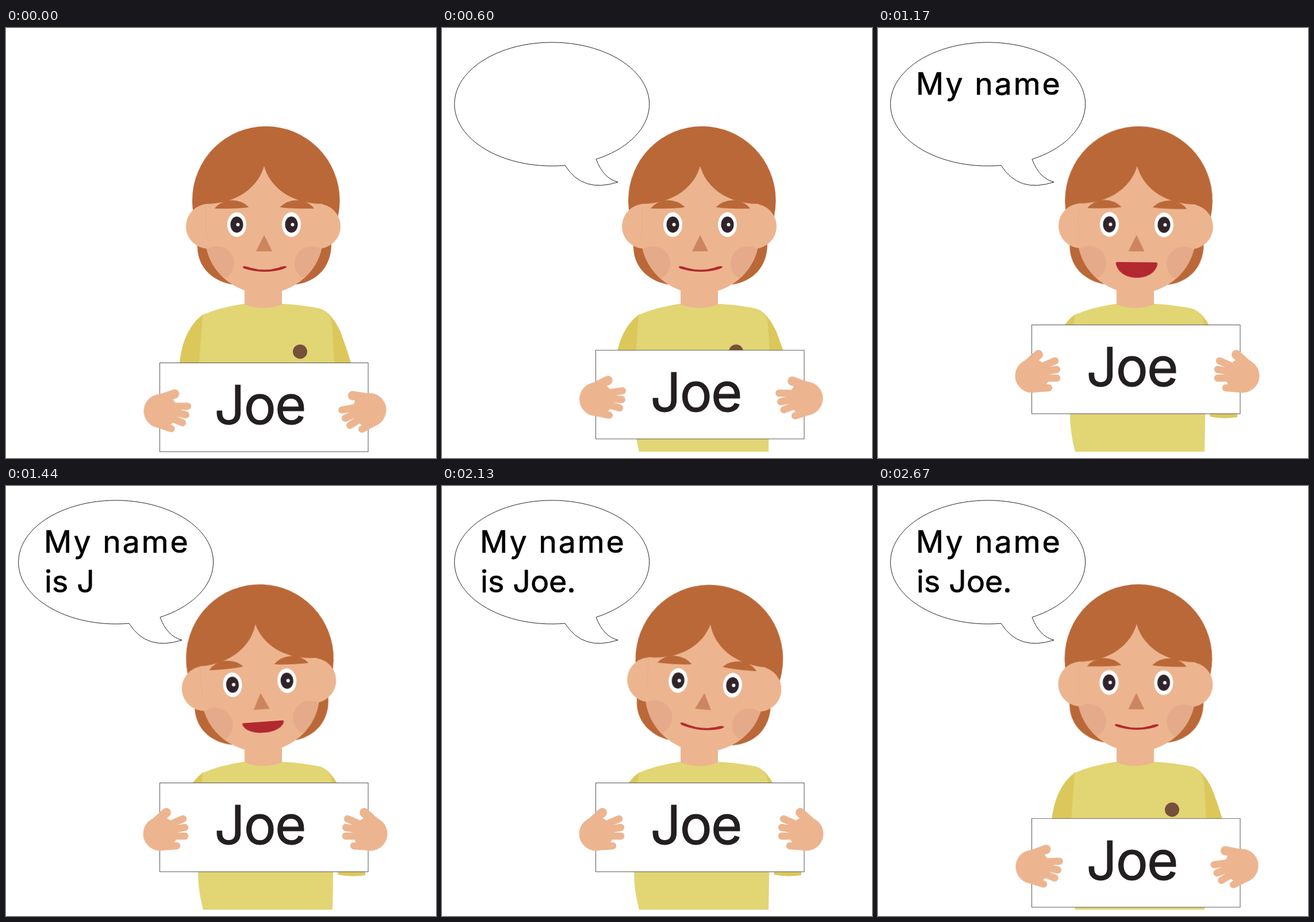
Recreate the animation shown at these times as an HTML page without scripts. Size 748 by 748 pixels, loop 2.7 s.

```html
<!DOCTYPE html>
<html lang="en">
<head>
<meta charset="utf-8">
<title>My name is Joe</title>
<style>
  html, body { margin: 0; width: 100%; height: 100%; overflow: hidden; background: #fff; }
  svg { display: block; width: 100%; height: 100%; }

  .skin { fill: #ecb58f; }
  .hair { fill: #ba6838; }
  .shirt { fill: #e2d574; }
  .sleeve { fill: #dcc75a; }
  .lips { fill: #b2282f; }
  .fingers { fill: none; stroke: #ecb58f; stroke-width: 12.5; stroke-linecap: round; }
  .outline { fill: #fff; stroke: #222; stroke-width: 1; }
  text { font-family: Inter, sans-serif; stroke-linejoin: round; }

  .head, .sign, .hand, .bubble, .smile, .talk, .speech {
    animation: 2700ms linear infinite;
  }

  .head { transform-origin: 448px 446px; animation-name: sway; }
  @keyframes sway {
    0%, 100% { transform: rotate(0deg); }
    11.111%, 55.556% { transform: rotate(-5.25deg); }
    33.333%, 77.778% { transform: rotate(5.25deg); }
  }

  .sign { animation-name: lift; }
  @keyframes lift {
    0%, 16.667%, 100% { transform: translateY(66px); }
    33.333%, 83.333% { transform: translateY(0); }
  }

  .hand { transform-origin: 280px 605px; animation-name: grip; }
  @keyframes grip {
    0%, 16.667%, 100% { transform: rotate(var(--tilt)); }
    33.333%, 83.333% { transform: rotate(0deg); }
  }

  .bubble { transform-origin: 192px 241px; animation-name: grow; }
  @keyframes grow {
    0%, 5.556% { transform: scale(0); }
    22.222%, 100% { transform: scale(1); }
  }

  .smile { animation-name: rest; }
  @keyframes rest {
    0%, 22.7%, 66.6%, 100% { visibility: visible; }
    22.8%, 66.5% { visibility: hidden; }
  }

  .talk { transform-origin: 450px 416.5px; animation-name: talk; }
  @keyframes talk {
    0%, 22.7% { transform: scaleY(.2); visibility: hidden; }
    22.8% { transform: scaleY(.2); visibility: visible; }
    44.444% { transform: scaleY(1); visibility: visible; }
    66.5% { transform: scaleY(.2); visibility: visible; }
    66.6%, 100% { transform: scaleY(.2); visibility: hidden; }
  }

  /* --typed counts shown characters; each letter compares it with its own index */
  @property --typed { syntax: "<number>"; inherits: true; initial-value: 0; }
  .speech { font-size: 53.6px; animation-name: type; }
  .speech tspan {
    --shown: clamp(0, (var(--typed) - var(--i) - .5) * 9, 1);
    fill: #000; fill-opacity: var(--shown);
    stroke: #000; stroke-width: .7; stroke-opacity: var(--shown);
  }
  @keyframes type {
    0% { --typed: 0; animation-timing-function: step-end; }
    26.667% { --typed: 0; animation-timing-function: steps(15, end); }
    60%, 100% { --typed: 15; }
  }
</style>
</head>
<body>
<svg viewBox="0 0 748 748">
  <defs>
    <path id="face" d="M449 240C440 274 405 306 347 306V372C352 424 398 462 449 462S546 424 551 372V306C493 306 458 274 449 240Z"/>
    <clipPath id="faceClip"><use href="#face"/></clipPath>
    <path id="brow" d="M363 314Q374 300 393 299.500Q411 300 422.500 311.500Q405 315 363 314Z"/>
    <g id="eye">
      <ellipse rx="16.500" ry="21.500" fill="#fff"/>
      <ellipse rx="11" ry="14" fill="#30242a"/>
      <circle cx="2" r="3" fill="#fff"/>
    </g>
    <g id="hand">
      <circle class="skin" cx="268" cy="605" r="29.500"/>
      <g class="fingers">
        <path d="M268 596L308 579M270 601L311 594M270 609H311M268 628L297 626"/>
        <path d="M250 594L279 568" stroke-width="16"/>
      </g>
    </g>
  </defs>

  <!-- body -->
  <path class="sleeve" d="M343 498Q308 524 302 582L296 650H345ZM546 488Q566 494 582 529Q592 555 600 582L625 662V677Q600 681 578 676L560 600Z"/>
  <path class="shirt" d="M342 499Q372 486 412 480H484Q520 482 546 488Q565 495 567 515L571 582L569 684L568 737H343Q334 704 334 671L336 582Z"/>
  <path class="skin" d="M415 445H480V481Q448 493 415 481Z"/>
  <circle cx="511.500" cy="563" r="12.500" fill="#75503a"/>

  <g class="head">
    <ellipse class="hair" cx="452.300" cy="300" rx="128.300" ry="129"/>
    <path class="hair" d="M324 300L333 382C334 420 364 441 392 446H506C540 441 566 416 566 376L580.500 300Z"/>
    <circle class="skin" cx="352" cy="345" r="39"/>
    <circle class="skin" cx="543" cy="345" r="39"/>
    <use href="#face" class="skin"/>
    <path d="M347.500 308V364" stroke="#e2a883" stroke-width=".6"/>
    <g clip-path="url(#faceClip)" fill="#e5aa8a">
      <circle cx="367" cy="409.500" r="30"/>
      <circle cx="532" cy="409.500" r="30"/>
    </g>
    <g class="hair">
      <use href="#brow"/>
      <use href="#brow" transform="translate(899) scale(-1 1)"/>
    </g>
    <use href="#eye" x="401.500" y="342"/>
    <use href="#eye" x="496.500" y="342"/>
    <path d="M449 360L435 388.500H463Z" fill="#cd855f"/>
    <path class="lips smile" d="M412 415Q411 418 420 420Q450 428 480 420Q489 417 488 415Q484 413 474 417Q450 424 425 417Q414 413 412 415Z"/>
    <path class="lips talk" d="M416 407H483Q487 407 485.500 412C478 443 422 443 414 412Q412 407 416 407Z"/>
  </g>

  <g class="sign">
    <rect x="267.500" y="516.500" width="362.500" height="154.500" fill="#fff" stroke="#555"/>
    <text x="362.500" y="623" font-size="93.500" letter-spacing="-2" fill="#231f20" stroke="#231f20">Joe</text>
    <g class="hand" style="--tilt: 23deg"><use href="#hand"/></g>
    <g transform="translate(902) scale(-1 1)">
      <g class="hand" style="--tilt: 33deg"><use href="#hand"/></g>
    </g>
  </g>

  <path class="bubble outline" d="M268 228.300A169.500 107.500 0 1 0 214 239Q245 288 306 268Q281 262 268 228.300Z"/>
  <g class="speech">
    <text x="66" y="116" letter-spacing="2.800"><tspan style="--i:0">M</tspan><tspan style="--i:1">y</tspan> <tspan style="--i:3">n</tspan><tspan style="--i:4">a</tspan><tspan style="--i:5">m</tspan><tspan style="--i:6">e</tspan></text>
    <text x="67" y="185"><tspan style="--i:8">i</tspan><tspan style="--i:9">s</tspan> <tspan style="--i:11">J</tspan><tspan style="--i:12">o</tspan><tspan style="--i:13">e</tspan><tspan style="--i:14">.</tspan></text>
  </g>
</svg>
</body>
</html>
```
